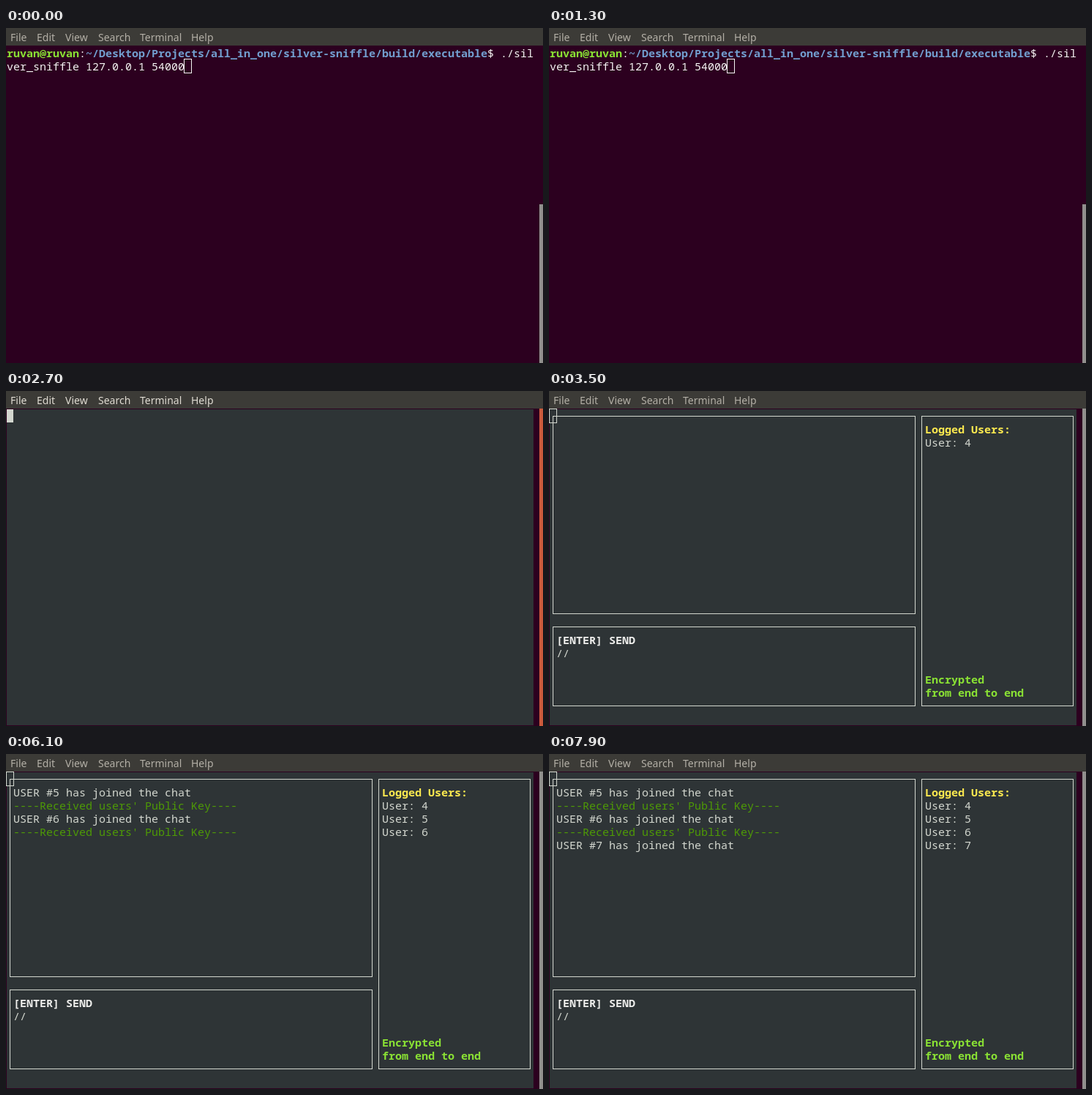
Write an HTML page that moves like this. It is 734 px wide and 458 px high and loops after 8000 ms.

```html
<!DOCTYPE html>
<html lang="en">
<head>
<meta charset="utf-8">
<title>Terminal chat</title>
<style>
  html, body { margin: 0; width: 100%; height: 100%; overflow: hidden; background: #2c001f; }
  svg { display: block; }
  text { white-space: pre; }
  .menu { font: 14px "Noto Sans", sans-serif; }
  .term { font: 15px "Noto Sans Mono", monospace; }
  .bold { font-weight: 700; }
  .frame { fill: none; stroke: #d3d7cf; shape-rendering: crispEdges; }
</style>
</head>
<body>
<svg id="stage" width="734" height="458" viewBox="0 0 734 458"></svg>
<script>
const LOOP = 8000;
const CELL_W = 9, ROW_H = 18, LEFT = 1, TOP = 25;
const FOCUS = [2000, 3400];
const CLEAR = 2700, DRAW = 2800;
const JOINS = [[5, 3900], [6, 5600], [7, 7600]];
const KEY_DELAY = 400;
const C = {
  plain: '#d3d7cf', white: '#f4f4f2', green: '#4e9a06',
  lime: '#8ae234', yellow: '#fce94f', blue: '#729fcf'
};

const stage = document.getElementById('stage');
const timed = [];

function add(parent, tag, attrs, content = '') {
  const el = document.createElementNS('http://www.w3.org/2000/svg', tag);
  for (const k in attrs) el.setAttribute(k, attrs[k]);
  el.textContent = content;
  parent.append(el);
  return el;
}

const rect = (parent, x, y, width, height, attrs) =>
  add(parent, 'rect', { x, y, width, height, ...attrs });

function show(el, from, to = LOOP) {
  timed.push({ el, from, to });
  return el;
}

function write(parent, col, row, str, fill, bold = false) {
  return add(parent, 'text', {
    x: LEFT + col * CELL_W, y: TOP + row * ROW_H + 15,
    class: bold ? 'term bold' : 'term', fill
  }, str);
}

// Line drawing runs through the centres of the cells.
function frame(parent, c0, r0, c1, r1) {
  rect(parent, LEFT + c0 * CELL_W + 4.5, TOP + r0 * ROW_H + 9.5,
    (c1 - c0) * CELL_W, (r1 - r0) * ROW_H, { class: 'frame' });
}

rect(stage, 0, 0, 734, 458, { fill: '#2c001f' });
rect(stage, 0, 0, 734, 24, { fill: '#3c3b37' });
const menu = add(stage, 'g', { class: 'menu' });
[['File', 6], ['Edit', 42], ['View', 81], ['Search', 126], ['Terminal', 183], ['Help', 253]]
  .forEach(([label, x]) => add(menu, 'text', { x, y: 18 }, label));

const shell = show(add(stage, 'g', {}), 0, CLEAR);
write(shell, 0, 0, 'ruvan@ruvan', C.lime, true);
write(shell, 11, 0, ':', C.white);
write(shell, 12, 0, '~/Desktop/Projects/all_in_one/silver-sniffle/build/executable', C.blue, true);
write(shell, 73, 0, '$ ./sil', C.white);
write(shell, 0, 1, 'ver_sniffle 127.0.0.1 54000', C.white);

const screen = show(add(stage, 'g', {}), CLEAR);
rect(screen, LEFT, TOP, 720, 432, { fill: '#2e3436' });

const chat = show(add(stage, 'g', {}), DRAW);
frame(chat, 0, 0, 55, 15);
frame(chat, 0, 16, 55, 22);
frame(chat, 56, 0, 79, 22);
write(chat, 1, 17, '[ENTER] SEND', '#eeeeec', true);
write(chat, 1, 18, '//', C.plain);
write(chat, 57, 1, 'Logged Users:', C.yellow, true);
write(chat, 57, 2, 'User: 4', C.plain);
write(chat, 57, 20, 'Encrypted', C.lime, true);
write(chat, 57, 21, 'from end to end', C.lime, true);

JOINS.forEach(([id, at], i) => {
  show(write(chat, 57, 3 + i, `User: ${id}`, C.plain), at);
  show(write(chat, 1, 1 + 2 * i, `USER #${id} has joined the chat`, C.plain), at);
  show(write(chat, 1, 2 + 2 * i, "----Received users' Public Key----", C.green), at + KEY_DELAY);
});

const bar = rect(stage, 729, 0, 5, 0, {});
const cursor = rect(stage, 0, 0, 0, 0, { 'shape-rendering': 'crispEdges' });

function set(el, attrs) {
  for (const k in attrs) el.setAttribute(k, attrs[k]);
}

function render(t) {
  const focused = t >= FOCUS[0] && t < FOCUS[1];
  const cleared = t >= CLEAR;
  for (const { el, from, to } of timed) {
    el.style.display = t >= from && t < to ? '' : 'none';
  }
  set(menu, { fill: focused ? '#dfdbd2' : '#b3afa6' });

  const top = cleared ? 24 : 241;
  set(bar, { y: top, height: 458 - top, fill: focused ? '#cb5a3c' : '#918f8d' });

  const x = LEFT + (cleared ? 0 : 27) * CELL_W;
  const y = TOP + (cleared ? 0 : 1) * ROW_H;
  const color = cleared ? C.plain : C.white;
  set(cursor, focused
    ? { x, y, width: CELL_W, height: ROW_H, fill: color, stroke: 'none' }
    : { x: x - 0.5, y: y - 0.5, width: CELL_W + 1, height: ROW_H + 1, fill: 'none', stroke: color });
}

const start = performance.now();
function tick() {
  render((performance.now() - start) % LOOP);
  requestAnimationFrame(tick);
}
tick();
</script>
</body>
</html>
```
